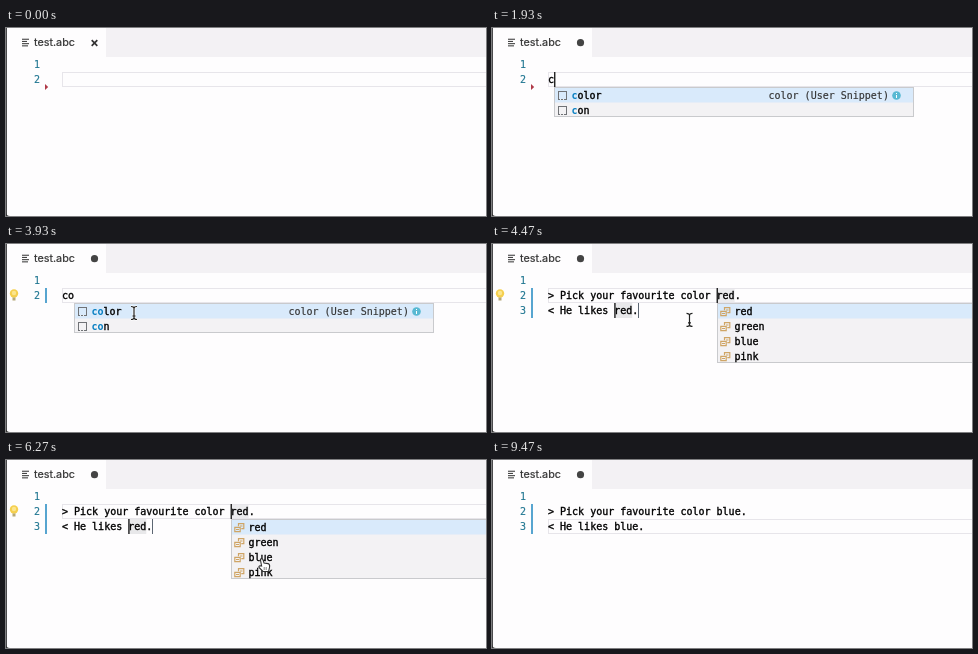
These frames come from a looping animation (480 px wide and 188 px high, 9870 ms). An HTML page with a canvas:

```html
<!DOCTYPE html>
<html>
<head>
<meta charset="utf-8">
<style>
  html, body { margin: 0; width: 100%; height: 100%; overflow: hidden; background: #fefdfe; }
  canvas { display: block; }
</style>
</head>
<body>
<canvas id="stage" width="480" height="188"></canvas>
<script>
const ctx = document.getElementById('stage').getContext('2d');
const LOOP = 9870, CHAR = 6.02, LEFT = 56, LINE = 15;
const MONO = '10px "DejaVu Sans Mono", monospace';

// Moments of the story, in ms
const T = { caret: 1530, c: 1870, co: 2070, bulb: 2400, bar: 2600, insert: 4000,
            bar3: 4400, choose: 6290, leave: 7940, bulbOff: 8200 };

// Pointer stops: time, x, y
const POINTER = [
  [2600, 190, 198], [3530, 128, 69], [4000, 128, 69], [4800, 238, 80],
  [5130, 248, 87], [5730, 256, 98], [8470, 256, 98], [8930, 250, 198]
];

const lineTop = n => 29 + (n - 1) * LINE;
const column = n => LEFT + n * CHAR;

function rect(x, y, w, h, color) {
  ctx.fillStyle = color;
  ctx.fillRect(x, y, w, h);
}

function box(x, y, w, h, color) {
  ctx.strokeStyle = color;
  ctx.lineWidth = 1;
  ctx.strokeRect(x + .5, y + .5, w - 1, h - 1);
}

function disc(x, y, r, color) {
  ctx.fillStyle = color;
  ctx.beginPath();
  ctx.arc(x, y, r, 0, 7);
  ctx.fill();
}

function path(d, stroke, width, fill) {
  const p = new Path2D(d);
  if (fill) { ctx.fillStyle = fill; ctx.fill(p); }
  if (stroke) { ctx.strokeStyle = stroke; ctx.lineWidth = width; ctx.stroke(p); }
}

// A hairline stroke thickens the letters by the given weight
function text(s, x, y, color = '#000', weight = .35, font = MONO) {
  ctx.font = font;
  ctx.fillStyle = ctx.strokeStyle = color;
  ctx.fillText(s, x, y);
  if (!weight) return;
  ctx.lineWidth = weight;
  ctx.strokeText(s, x, y);
}

function at(x, y, draw) {
  ctx.save();
  ctx.translate(x, y);
  draw();
  ctx.restore();
}

function drawTab(t) {
  rect(0, 0, 480, 188, '#fefdfe');
  rect(100, 0, 380, 29, '#f3f1f4');
  [7, 5, 7, 6].forEach((w, i) => rect(16, 10.7 + i * 2.2, w, 1.1, '#444'));
  text('test.abc', 28, 18, '#333', .2, '10.8px Inter, sans-serif');
  if (t < T.c) path('M85.7 12.2l5.6 5.6m0-5.6l-5.6 5.6', '#333', 1.7);
  else disc(88.5, 14.7, 3.6, '#444');
}

function drawBulb() {
  disc(8, 49.5, 4.2, '#f5cf4e');
  disc(8, 49, 2.2, '#fbe58e');
  rect(6.5, 53.5, 3, 3, '#b5a878');
}

function drawGutter(t) {
  const lines = t < T.insert ? 2 : 3;
  for (let n = 1; n <= lines; n++) text(n, 28, lineTop(n) + 11, '#237893', .15);
  if (t < T.bar) path('M39 56l3.2 3-3.2 3z', null, 0, '#b03a48');
  else rect(39, 44, 2, t < T.bar3 ? 15 : 30, '#57a5d0');
  if (t >= T.bulb && t < T.bulbOff) drawBulb();
}

function drawCode(t) {
  const activeLine = t < T.leave ? 2 : 3;
  box(LEFT, lineTop(activeLine), 430, LINE, '#e7e5ea');
  if (t < T.c) return;
  if (t < T.insert) return text(t < T.co ? 'c' : 'co', LEFT, 55);

  const choosing = t < T.choose, word = choosing ? 'red' : 'blue';
  if (choosing) {
    rect(column(28), 45, 3 * CHAR, 13, '#ececee');
    rect(column(11), 59, 3 * CHAR, 15, '#e8e8ea');
  }
  text(`> Pick your favourite color ${word}.`, LEFT, 55);
  text(`< He likes ${word}.`, LEFT, 70);
  if (t < T.leave) rect(Math.round(column(12 + word.length)), 59, 1, 15, '#5c6672');
}

// Carets blink every half second, starting afresh after each edit
function drawCarets(t) {
  const stages = [
    [T.caret, [0, 2]], [T.c, [1, 2]], [T.co, [2, 2]],
    [T.insert, [28, 2], [11, 3]], [T.choose, [32, 2], [15, 3]], [T.leave, [16, 3]]
  ];
  const stage = stages.filter(s => s[0] <= t).pop();
  if (!stage) return;
  const [start, ...carets] = stage;
  if (Math.floor((t - start) / 500) % 2) return;
  for (const [col, line] of carets) rect(column(col), lineTop(line), 1.4, LINE, '#222');
}

function drawPanel(x, w, rows) {
  const h = rows * LINE;
  rect(x, 59, w, h, '#f3f2f4');
  rect(x + 1, 60, w - 1, 14.5, '#d9eafb');
  box(x, 59, w, h, '#c9cacd');
}

function drawSuggestions(typed) {
  const x = column(typed.length);
  at(Math.round(x), 0, () => {
    drawPanel(0, 360, 2);
    ['color', 'con'].forEach((word, i) => {
      const y = 71 + i * LINE;
      box(4, y - 8, 9, 9, '#707276');
      rect(6, y, 1, 1, '#eee');
      rect(9, y, 1, 1, '#eee');
      text(typed, 17.5, y, '#087fc2', 0, 'bold ' + MONO);
      text(word.slice(typed.length), 17.5 + typed.length * CHAR, y);
    });
    text('color (User Snippet)', 214.5, 71, '#333', .15);
    disc(342.5, 67.5, 4.3, '#58b9d3');
    rect(342, 65, 1, 1, '#fff');
    rect(342, 67, 1, 3, '#fff');
  });
}

function drawChoices() {
  drawPanel(225, 260, 4);
  ['red', 'green', 'blue', 'pink'].forEach((word, i) => {
    const y = 71 + i * LINE;
    at(228, y - 8.5, () => {
      path('M4.5 3.8v-2.6h5.3v5h-2.5M6 3.5h2.5', '#cfa566', 1.2);
      path('M.8 4.8h5.4v4.4h-5.4zM2 7h3', '#cfa566', 1.2);
    });
    text(word, 242.5, y);
  });
}

function drawPointer(t) {
  const i = POINTER.findIndex(p => p[0] > t);
  if (i < 1) return;
  const [t0, x0, y0] = POINTER[i - 1], [t1, x1, y1] = POINTER[i];
  const p = (t - t0) / (t1 - t0), k = p * p * (3 - 2 * p);
  const x = x0 + (x1 - x0) * k, y = y0 + (y1 - y0) * k;
  const overChoices = t >= T.insert && t < T.choose && x > 225;
  at(x, y, () => {
    if (overChoices) {
      path('M-1.6 1.5Q-.6-.2 .8 1.4L2 5L6 5.6Q8 6.4 7.6 9L6.6 13.5H1L-3 9.5Q-3.6 7.4-.4 8z', '#333', 1.1, '#fff');
      path('M2.2 9v3m2-3v3', '#555', .7);
    } else {
      const beam = 'M-3-6.5Q0-6.5 0-4.5Q0-6.5 3-6.5M0-5V5M-3 6.5Q0 6.5 0 4.5Q0 6.5 3 6.5M-1.5 3h3';
      path(beam, '#fff', 2.6);
      path(beam, '#222', 1.2);
    }
  });
}

function drawWindowEdge() {
  rect(0, 0, 1, 188, '#4a4a4c');
  path('M0 184Q0 188 4 188H0z', null, 0, '#333');
}

function draw(t) {
  drawTab(t);
  drawGutter(t);
  drawCode(t);
  drawCarets(t);
  if (t >= T.c && t < T.insert) drawSuggestions(t < T.co ? 'c' : 'co');
  if (t >= T.insert && t < T.choose) drawChoices();
  drawPointer(t);
  drawWindowEdge();
}

const started = performance.now();
function tick() {
  draw((performance.now() - started) % LOOP);
  requestAnimationFrame(tick);
}
tick();
</script>
</body>
</html>
```
